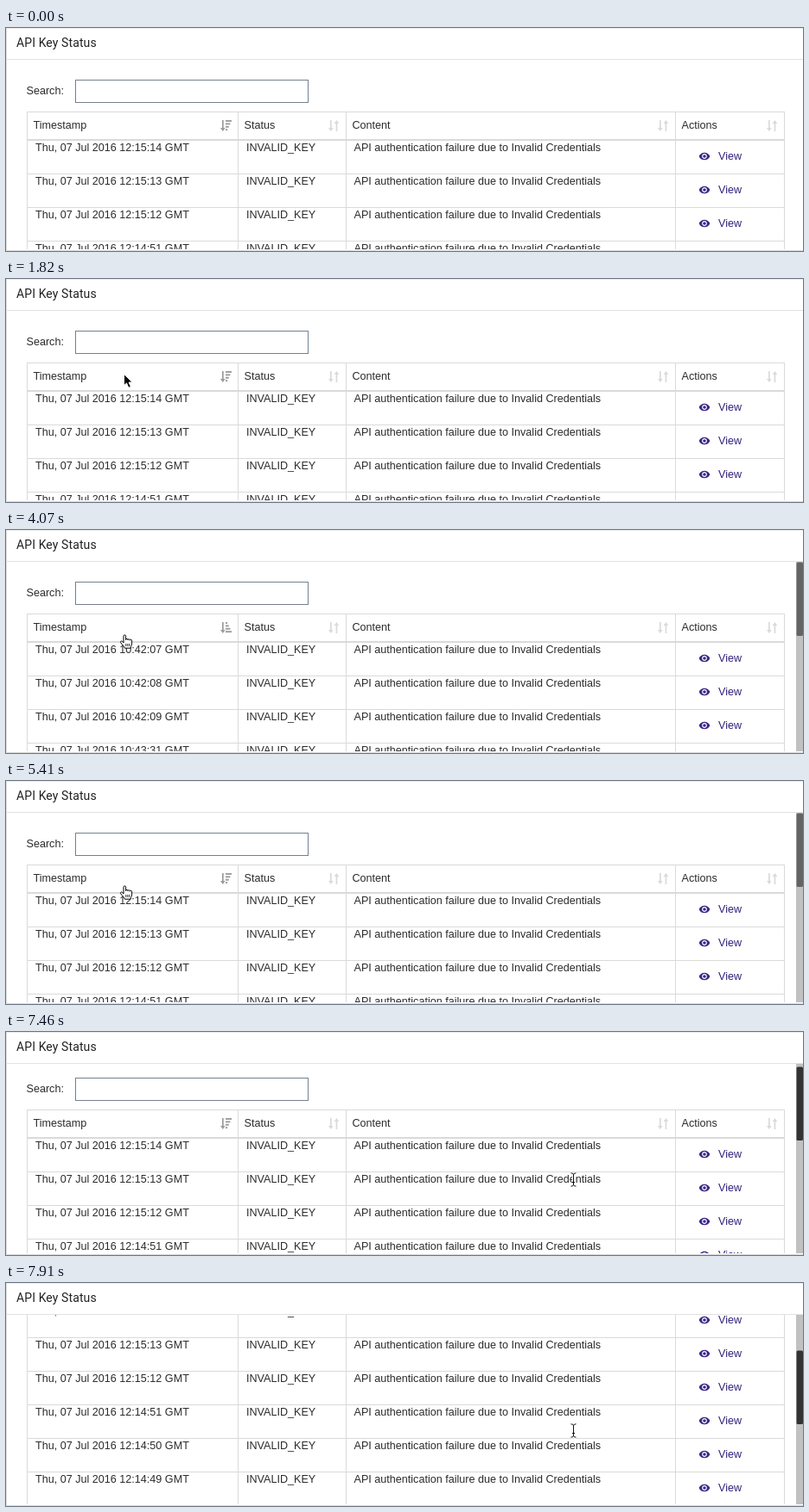
An HTML page for the animation above (8 s loop, 922x259 px).

```html
<!DOCTYPE html>
<html lang="en">
<head>
<meta charset="utf-8">
<title>API Key Status</title>
<style>
html, body { margin: 0; width: 100%; height: 100%; overflow: hidden; background: #fff; }
svg { display: block; }
text { font: 12.6px "Liberation Sans", Arial, sans-serif; fill: #2b2b2b; white-space: pre; }
.title { font: 14px Roboto, sans-serif; letter-spacing: .1px; fill: #222; }
.view { fill: #32207a; }
.line { fill: #dadada; }
</style>
</head>
<body>
<svg id="stage" width="922" height="259" viewBox="0 0 922 259">
  <defs>
    <clipPath id="pane"><rect y="37" width="922" height="220"/></clipPath>
    <path id="eye" fill="#3d2785" transform="scale(.58) translate(-12 -12)" d="M12 4.5C7 4.5 2.73 7.61 1 12c1.73 4.39 6 7.5 11 7.5s9.27-3.11 11-7.5c-1.73-4.39-6-7.5-11-7.5zM12 17c-2.76 0-5-2.24-5-5s2.24-5 5-5 5 2.24 5 5-2.24 5-5 5zm0-8c-1.66 0-3 1.34-3 3s1.34 3 3 3 3-1.34 3-3-1.34-3-3-3z"/>
    <path id="down" d="M2 0h1.7v9h2L2.85 13 0 9h2z"/>
    <g id="unsorted" fill="#dadada">
      <use href="#down"/>
      <use href="#down" transform="translate(6.6 13) scale(1 -1)"/>
    </g>
  </defs>
  <rect width="922" height="259" fill="#fff"/>
  <g clip-path="url(#pane)">
    <g id="content"></g>
    <g id="scrollbar">
      <rect x="914" y="37" width="8" height="220" fill="#c1c1c1"/>
      <rect id="thumb" x="914.5" y="37.5" width="7.5" height="85.5" rx="1.5"/>
    </g>
  </g>
  <g class="line">
    <rect width="922" height="1" fill="#eee"/>
    <rect width="1" height="259"/>
    <rect y="36" width="922" height="1" fill="#e2e2e2"/>
    <rect y="258" width="922" height="1"/>
  </g>
  <text class="title" x="12" y="22">API Key Status</text>
  <g id="arrow">
    <path d="M1.5.5v13.2l3-2.8 2.3 5.4 2.6-1.1-2.3-5.2h4.1z" fill="#000" stroke="#fff" stroke-width="1"/>
  </g>
  <g id="hand" stroke="#000" stroke-width="1" stroke-linejoin="round">
    <path fill="#fff" d="M5 10V2.2a1.3 1.3 0 0 1 2.6 0v4.3a1.2 1.2 0 0 1 2.4.2 1.2 1.2 0 0 1 2.4.5 1.1 1.1 0 0 1 2.2.6v3c0 2-1.2 2.6-1.4 5.4H6.4C6 14.3 2.6 11.6 1.6 9.5c-.5-1.3 1-2.1 2-1.1z"/>
    <path fill="none" stroke-width=".8" d="M7.8 11v3M9.8 11v3M11.8 11v3"/>
  </g>
  <g id="beam" fill="none">
    <path id="beamLine" stroke="#fff" stroke-width="2.6" d="M1.5.8q3 0 3 2v11.4q0 2-3 2M7.5.8q-3 0-3 2v11.4q0 2 3 2M3 11.5h3"/>
    <use href="#beamLine" style="stroke:#000;stroke-width:1"/>
    <path stroke="#111" d="M1.5.8q3 0 3 2v11.4q0 2-3 2M7.5.8q-3 0-3 2v11.4q0 2 3 2M3 11.5h3"/>
  </g>
</svg>
<script>
const LOOP = 8000;
const ROW = 39;
const $ = id => document.getElementById(id);

const newest = ["12:15:14", "12:15:13", "12:15:12", "12:14:51", "12:14:50", "12:14:49", "12:14:48"];
const oldest = ["10:42:07", "10:42:08", "10:42:09", "10:43:31", "10:43:32", "10:43:33", "10:43:34"];

const text = (x, y, s, cls = "") => `<text x="${x}" y="${y}" class="${cls}">${s}</text>`;
const box = (x, y, w, h) => `<rect class="line" x="${x}" y="${y}" width="${w}" height="${h}"/>`;

function sortIcon(id, widths) {
  const bars = widths.map((w, i) => `<rect x="6" y="${i * 3.4}" width="${w}" height="1.9"/>`);
  return `<g id="${id}" transform="translate(248 107)" fill="#9c9c9c"><use href="#down"/>${bars.join("")}</g>`;
}

function row(time, i) {
  const y = 130 + i * ROW;
  return `<text x="34" y="${y + 13}">Thu, 07 Jul 2016 <tspan class="time">${time}</tspan> GMT</text>` +
    text(278, y + 13, "INVALID_KEY") +
    text(402.5, y + 13, "API authentication failure due to Invalid Credentials") +
    `<use href="#eye" x="0" y="0" transform="translate(808 ${y + 19})"/>` +
    text(824, y + 23, "View", "view") +
    box(24, y + ROW, 877, 1);
}

$("content").innerHTML =
  text(23.5, 77, "Search:") +
  `<rect x="80.5" y="60.5" width="269" height="26" fill="#fff" stroke="#738090"/>` +
  box(24, 97, 877, 1) + box(24, 129, 877, 2) +
  [24, 268, 393, 774, 900].map(x => box(x, 97, 1, 400)).join("") +
  text(31.5, 117, "Timestamp") + text(275.5, 117, "Status") +
  text(400.5, 117, "Content") + text(781.5, 117, "Actions") +
  sortIcon("descending", [7, 5.4, 3.8, 2.2]) + sortIcon("ascending", [2.2, 3.8, 5.4, 7]) +
  [373, 754, 880].map(x => `<use href="#unsorted" transform="translate(${x} 107)"/>`).join("") +
  newest.map(row).join("");

const times = [...document.querySelectorAll(".time")];

// [start, cursor, x, y]
const pointer = [
  [0, "", 0, 0],
  [500, "arrow", 600, 212], [650, "arrow", 574, 192], [790, "arrow", 349, 120],
  [940, "arrow", 173, 85], [1240, "arrow", 156, 81], [1390, "arrow", 151, 83],
  [1530, "arrow", 147, 86], [1680, "arrow", 136, 103], [1820, "arrow", 135, 110],
  [3170, "hand", 131, 120], [3320, "hand", 131, 121], [6610, "hand", 132, 122],
  [6760, "hand", 330, 96], [6880, "hand", 656, 140],
  [7020, "beam", 685, 170], [7170, "beam", 652, 163]
];
// [start, scroll offset]
const scroll = [[0, 0], [7460, 7], [7610, 29], [7760, 68], [7910, 106]];
// [start, thumb colour]
const thumbColor = [[0, "none"], [3170, "#7d7d7d"], [3320, "#646464"], [7460, "#333"]];

const at = (steps, t) => steps.findLast(step => step[0] <= t);
const show = (id, on) => $(id).setAttribute("visibility", on ? "visible" : "hidden");
const move = (id, x, y) => $(id).setAttribute("transform", `translate(${x} ${y})`);

function draw(t) {
  const [, cursor, x, y] = at(pointer, t);
  for (const id of ["arrow", "hand", "beam"]) {
    show(id, id === cursor);
    move(id, x, y);
  }
  const offset = at(scroll, t)[1];
  move("content", 0, -offset);
  move("thumb", 0, Math.round(offset * .39));
  $("thumb").setAttribute("fill", at(thumbColor, t)[1]);
  show("scrollbar", t >= 3170);

  const reversed = t >= 4070 && t < 5410;
  show("ascending", reversed);
  show("descending", !reversed);
  times.forEach((el, i) => { el.textContent = (reversed ? oldest : newest)[i]; });
}

const start = performance.now();
function tick() {
  draw((performance.now() - start) % LOOP);
  requestAnimationFrame(tick);
}
draw(0);
requestAnimationFrame(tick);
</script>
</body>
</html>
```
